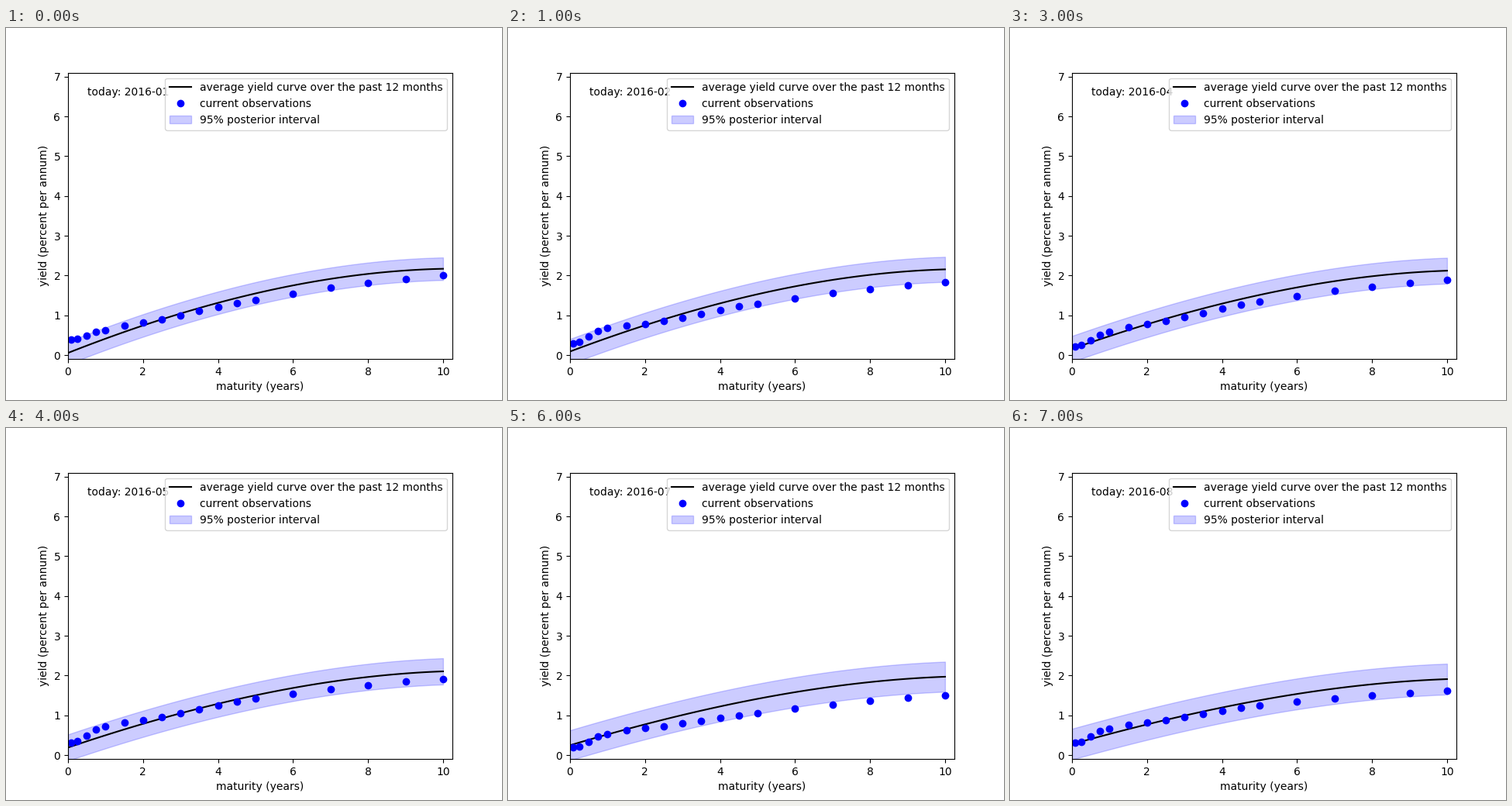
Animation, 640 px wide and 480 px high, one loop 8000 ms. Source, as a matplotlib script:

```python
import numpy as np
import matplotlib.pyplot as plt
from matplotlib.animation import FuncAnimation

plt.rcParams["font.family"] = "DejaVu Sans"

MONTHS = 8
MATURITIES = np.concatenate([[1 / 12, .25, .5, .75], np.arange(1, 5, .5), np.arange(5, 11)])

# observed yields at a few key maturities, one row per month
KEY_MATURITIES = np.array([1 / 12, 1, 2, 5, 10])
KEY_YIELDS = np.array([
    [.39, .625, .82, 1.385, 2.0],
    [.29, .685, .78, 1.29, 1.83],
    [.205, .60, .74, 1.255, 1.83],
    [.215, .585, .78, 1.345, 1.89],
    [.31, .72, .875, 1.42, 1.91],
    [.235, .505, .585, 1.03, 1.52],
    [.19, .52, .68, 1.045, 1.50],
    [.31, .665, .82, 1.25, 1.615],
])
# shape of each stretch between keys: concave bow, S-shaped wave
BOW = np.array([0, .4, 0, .4])
WAVE = np.array([1, 0, .3, 0])

# average curve: level at 0, 5 and 10 years and half-width of the interval
KEY_MONTHS = [0, 1, 4, 5, 7]
CURVE_KEYS = [
    [.055, .09, .19, .22, .275],
    [1.55, 1.53, 1.503, 1.45, 1.378],
    [2.17, 2.155, 2.105, 2.03, 1.91],
    [.284, .315, .33, .367, .388],
]


def observations(month):
    seg = np.searchsorted(KEY_MATURITIES[1:-1], MATURITIES, side="right")
    start, end = KEY_MATURITIES[seg], KEY_MATURITIES[seg + 1]
    u = (MATURITIES - start) / (end - start)
    smooth = u * u * (3 - 2 * u)
    ease = u + BOW[seg] * u * (1 - u) + WAVE[seg] * (smooth - u)
    keys = KEY_YIELDS[month]
    return keys[seg] + (keys[seg + 1] - keys[seg]) * ease


def average_curve(month):
    *levels, half = [np.interp(month, KEY_MONTHS, keys) for keys in CURVE_KEYS]
    parabola = np.polyval(np.polyfit([0, 5, 10], levels, 2), x)
    return parabola - .0003 * x * (x - 5) * (x - 10), half


fig, ax = plt.subplots(figsize=(6.4, 4.8), dpi=100)
ax.set(xlim=(0, 10.25), ylim=(-0.1, 7.1),
       xlabel="maturity (years)", ylabel="yield (percent per annum)")

x = np.linspace(0, 10, 101)
mean_line, = ax.plot(x, 0 * x, "k", label="average yield curve over the past 12 months")
dots, = ax.plot(MATURITIES, 0 * MATURITIES, "bo", label="current observations")
band = ax.fill_between(x, 0 * x, 0 * x, color="blue", alpha=0.2,
                       label="95% posterior interval")
today = ax.text(0.05, 0.92, "", transform=ax.transAxes)
ax.legend(loc="upper right")


def update(month):
    mean, half = average_curve(month)
    mean_line.set_ydata(mean)
    lower = np.column_stack([x, mean - half])
    upper = np.column_stack([x, mean + half])
    band.set_verts([np.vstack([lower, upper[::-1]])])
    dots.set_ydata(observations(month))
    today.set_text(f"today: 2016-{month + 1:02d}")
    return mean_line, dots, band, today


anim = FuncAnimation(fig, update, frames=MONTHS, interval=1000, repeat=True)
plt.show()
```
